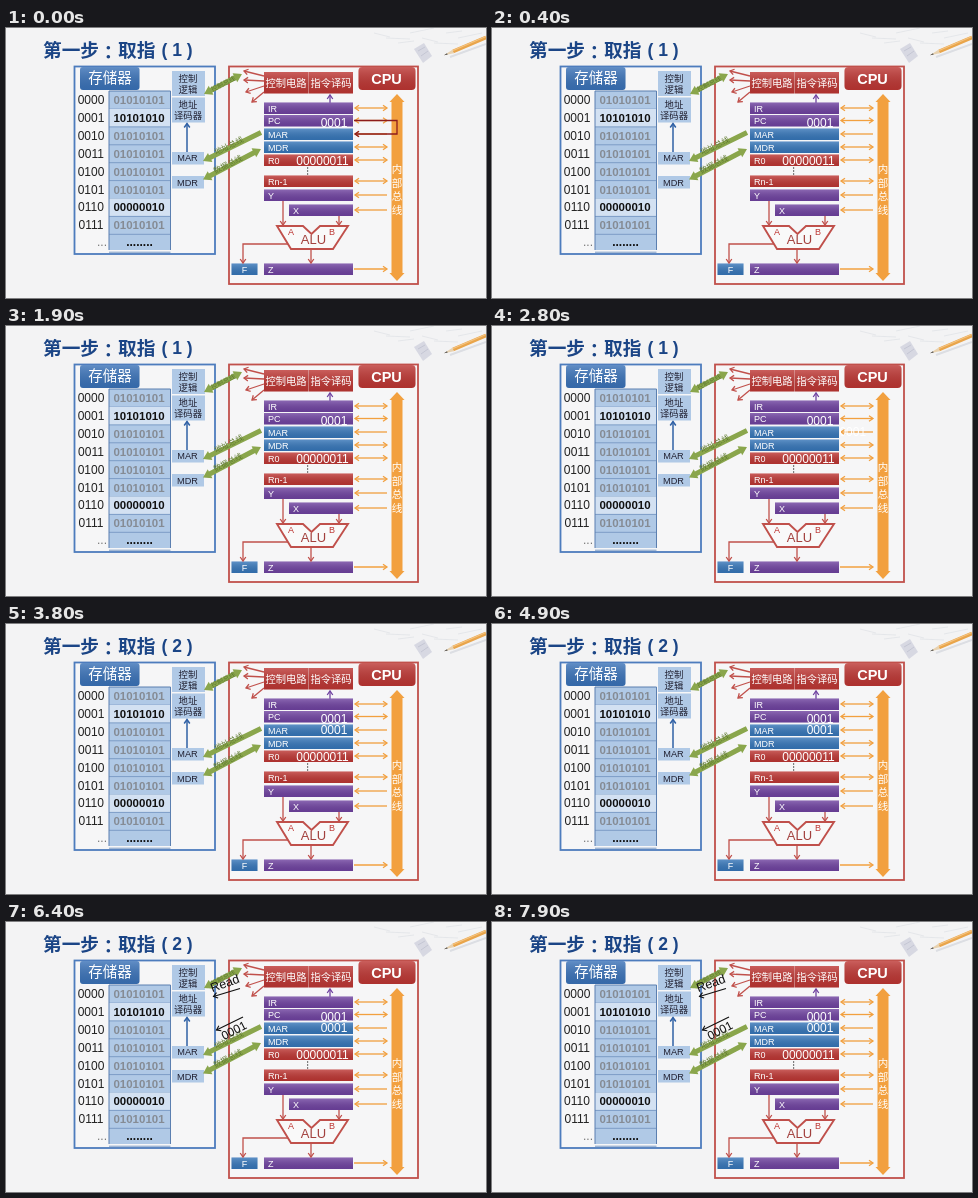
These frames come from a looping animation (480x270 px, 8000 ms). An HTML page:

```html
<!DOCTYPE html>
<html lang="zh-Hans">
<head>
<meta charset="utf-8">
<style>
html, body { margin: 0; width: 100%; height: 100%; overflow: hidden; background: #f3f3f4; }
svg { display: block; width: 480px; height: 270px; }
text { font-family: "Liberation Sans", "Noto Sans CJK SC", "Noto Sans CJK", sans-serif; dominant-baseline: central; }
.colon { font-family: "Noto Sans CJK TC", "Noto Sans CJK", sans-serif; }
</style>
</head>
<body>
<svg id="stage" viewBox="0 0 480 270">
  <defs>
    <linearGradient id="shine" x2="0" y2="1">
      <stop offset="0" stop-color="#fff" stop-opacity=".2"/><stop offset="1" stop-color="#000" stop-opacity=".08"/>
    </linearGradient>
  </defs>
  <rect width="480" height="270" fill="#f3f3f4"/>
  <g id="decor"></g>
  <g id="board"></g>
  <g id="moving"></g>
</svg>
<script>
const $ = id => document.getElementById(id);
const RED = '#bd3633', LINE_RED = '#c0504b', BLUE = '#3676b9', PURPLE = '#6f42a0',
      ORANGE = '#f2a03f', GREEN = '#8aa64c', NAVY = '#1b4586', PALE = '#b0c9e6';
let layer = $('decor');

function add(tag, attrs, content) {
  const el = document.createElementNS('http://www.w3.org/2000/svg', tag);
  for (const k in attrs) el.setAttribute(k, attrs[k]);
  if (content !== undefined) el.textContent = content;
  layer.appendChild(el);
  return el;
}

function group(parent) {
  layer = parent;
  return layer = add('g', {});
}

const box = (x, y, w, h, fill, more) => add('rect', { x, y, width: w, height: h, fill, ...more });

function glossy(x, y, w, h, fill, more) {
  box(x, y, w, h, fill, more);
  box(x, y, w, h, 'url(#shine)', more);
}

const label = (s, x, y, size, fill, more) =>
  add('text', { x, y, 'font-size': size, fill, 'text-anchor': 'middle', ...more }, s);

const path = (d, stroke, width = 1, fill = 'none') =>
  add('path', { d, stroke, 'stroke-width': width, fill });

const degrees = (x1, y1, x2, y2) => Math.atan2(y2 - y1, x2 - x1) * 180 / Math.PI;

function openHead(x, y, angle, color, width, size) {
  add('path', { d: `M${-size} ${-size * 0.7}L0 0L${-size} ${size * 0.7}`, fill: 'none', stroke: color,
    'stroke-width': width, transform: `translate(${x} ${y}) rotate(${angle})` });
}

// ends: 1 = head at the end, 2 = heads on both ends
function arrow(x1, y1, x2, y2, color, width = 1.3, ends = 1, size = 4) {
  const deg = degrees(x1, y1, x2, y2);
  path(`M${x1} ${y1}L${x2} ${y2}`, color, width);
  openHead(x2, y2, deg, color, width, size);
  if (ends > 1) openHead(x1, y1, deg + 180, color, width, size);
}

// Thick arrow with solid heads, drawn along its own axis
function bus(x1, y1, x2, y2, ends) {
  const n = Math.hypot(x2 - x1, y2 - y1), w = 2.6, h = 5, s = 8;
  const tail = ends > 1 ? `${s} ${w}V${h}L0 0L${s} ${-h}V${-w}` : `0 ${w}V${-w}`;
  add('path', { d: `M${tail}H${n - s}V${-h}L${n} 0L${n - s} ${h}V${w}Z`, fill: GREEN,
    transform: `translate(${x1} ${y1}) rotate(${degrees(x1, y1, x2, y2)})` });
}

function tilted(s, x, y, angle, size, fill) {
  label(s, x, y, size, fill, { transform: `rotate(${angle} ${x} ${y})` });
}

function drawDecor() {
  for (let i = 0; i < 8; i++) {
    path(`M${368 + i * 12} ${5 + i % 3 * 5}l${16 + i % 2 * 8} ${4 - i % 4 * 3}`, '#dfe1e6', 0.7);
  }
  path('M408 21L418 15L426 28L417 35Z', 'none', 0, '#d7d8e2');
  path('M412 23L419 19M415 28L422 23', '#bfc2d0', 0.8);
  path('M444 29L480 16', '#dcdee3', 2);
  path('M447 23.5L480 9.5', '#e9a54b', 3.6);
  path('M447 22.5L480 8.5', '#f5c583', 1.1);
  path('M438 27.3L446.4 21.8L447.8 25.2Z', 'none', 0, '#e8d2b0');
  path('M438 27.3L441 25.3L441.7 26.6Z', 'none', 0, '#444');
}

function drawMemory() {
  box(68.5, 38.5, 140.5, 187.5, '#f6f6f7', { stroke: '#4d7cbd', 'stroke-width': 1.8 });
  glossy(74, 39, 59.5, 23, '#3a72b8', { rx: 3 });
  label('存储器', 104, 50, 14.5, '#fff');
  box(103, 63, 61.5, 159, PALE);
  for (let i = 0; i < 9; i++) {
    const y = 72 + i * 17.9, hot = i === 1 || i === 6;
    if (hot) box(103, y - 9, 61.5, 18, '#d3e1f2');
    path(`M103 ${y + 9}H164.5`, '#7c9cc6', 1);
    if (i === 8) {
      label('...', 96, y - 1, 12, '#777');
      label('........', 133.5, y - 1, 12, '#111', { 'font-weight': 700 });
      continue;
    }
    const data = hot ? (i === 1 ? '10101010' : '00000010') : '01010101';
    label(i.toString(2).padStart(4, '0'), 85, y, 12, '#222');
    label(data, 133, y, 11.5, hot ? '#111' : '#858b94', { 'font-weight': 700 });
  }
  path('M103 63V222M164.5 63V222M103 63H164.5', '#5b7fb0', 1);

  box(166, 43, 33, 25, PALE);
  box(166, 69.5, 33, 25, PALE);
  box(166, 124, 32, 12.5, PALE);
  box(166, 148, 32, 12.5, PALE);
  [['控制', 50.5], ['逻辑', 61.5], ['地址', 76], ['译码器', 87]]
    .forEach(([s, y]) => label(s, 182, y, 9.4, '#223'));
  label('MAR', 181.5, 130.3, 9.2, '#223');
  label('MDR', 181.5, 154.5, 9.2, '#223');
  arrow(181, 124, 181, 95.5, '#2f60a5', 1.5);
}

function drawRegister(name, y, color, ends, x = 258) {
  glossy(x, y - 5.5, 347 - x, 11.5, color);
  label(name, x + 4, y + 0.5, 9, '#fff', { 'text-anchor': 'start' });
  if (name === 'Z') arrow(348, y, 381, y, ORANGE);
  else arrow(381, y, 349, y, ORANGE, 1.3, ends);
}

function drawCpu() {
  box(223, 38.5, 189, 217.5, '#f6f6f7', { stroke: LINE_RED, 'stroke-width': 1.8 });
  glossy(352.5, 39, 57, 23, RED, { rx: 4 });
  label('CPU', 380.5, 50.5, 14.5, '#fff', { 'font-weight': 700 });
  glossy(258, 44, 44.5, 21.5, RED);
  glossy(302.8, 44, 44.2, 21.5, RED);
  label('控制电路', 280, 55, 10.3, '#fff');
  label('指令译码', 325, 55, 10.3, '#fff');
  [[48, 238, 43], [53, 238, 52], [58, 240, 64], [64, 246, 74]]
    .forEach(([y, tx, ty]) => arrow(258, y, tx, ty, LINE_RED));
  arrow(324, 75, 324, 67, PURPLE);

  path('M391 66L398.5 74H396.5V245H398.5L391 253L383.5 245H385.5V74H383.5Z', 'none', 0, ORANGE);
  [...'内部总线'].forEach((c, i) => label(c, 391, 141 + i * 13.5, 10.5, '#fff'));

  drawRegister('IR', 80, PURPLE, 2);
  drawRegister('PC', 92.5, PURPLE, 2);
  drawRegister('MAR', 106, BLUE, 1);
  drawRegister('MDR', 119, BLUE, 2);
  drawRegister('R0', 132, RED, 2);
  drawRegister('Rn-1', 153, RED, 2);
  drawRegister('Y', 167, PURPLE, 1);
  drawRegister('X', 182, PURPLE, 1, 283);
  drawRegister('Z', 241, PURPLE, 1);
  glossy(225.5, 235.5, 26, 11.5, BLUE);
  label('F', 238.5, 241.5, 9, '#fff');
  label('0001', 328, 94.5, 12, '#fff');
  label('00000011', 316.5, 132.5, 12, '#fff');
  [140, 143, 146].forEach(y => box(301, y - 0.6, 1.2, 1.2, '#333'));

  path('M271 198H297L305.5 206L314 198H342L327 221H285Z', LINE_RED, 1.9, '#f9f9f9');
  label('A', 285, 204, 9, RED);
  label('B', 326, 204, 9, RED);
  label('ALU', 307.5, 211.5, 13, '#a2403d');
  arrow(277, 173, 277, 197, LINE_RED);
  arrow(333, 188, 333, 197, LINE_RED);
  arrow(305, 221, 305, 235, LINE_RED);
  path('M282 216H237V235', LINE_RED, 1.3);
  openHead(237, 235, 90, LINE_RED, 1.3, 4);
}

function drawBuses() {
  bus(198, 66, 236, 46, 2);
  bus(255, 104.5, 197, 133, 1);
  bus(197, 151.5, 255, 121, 2);
  tilted('控制总线', 217, 55.5, -27, 6.5, '#5f7a30');
  tilted('地址总线', 223, 118, -26, 7.8, '#5f7a30');
  tilted('数据总线', 222, 136.5, -27, 7.8, '#5f7a30');
}

drawDecor();
layer = $('board');
drawMemory();
drawCpu();
drawBuses();

const heading = { 'font-size': 18.7, 'font-weight': 700, 'text-anchor': 'start' };
label('第一步', 37, 22, 0, NAVY, heading);
label('：', 93, 22, 0, NAVY, { ...heading, class: 'colon', lang: 'zh-Hant' });
label('取指', 112, 22, 0, NAVY, heading);
const part = label('', 171, 22, 17.5, NAVY, { 'font-weight': 700, 'xml:space': 'preserve' });

const route = group($('moving'));
path('M348 92.5H391V106H349', '#8d1c1c', 1.3);
openHead(349, 106, 180, '#8d1c1c', 1.3, 4);

const token = group($('moving'));
label('0001', 0, 0, 12, '#fff');

const address = group($('moving'));
tilted('0001', 228, 108.5, -27, 12, '#111');
arrow(237, 95, 210.5, 108, '#111', 1.1);

const read = group($('moving'));
tilted('Read', 219, 61.5, -20, 12.5, '#111');
arrow(234, 66.5, 207.5, 74.5, '#111', 1.1);

const ramp = (t, a, b) => Math.min(1, Math.max(0, (t - a) / (b - a)));

// From PC out to the bus, down, and back into MAR
function tokenPlace(p) {
  const out = 56, down = 11.5, s = p * (2 * out + down);
  if (s < out) return [328 + s, 94.5];
  if (s < out + down) return [328 + out, 94.5 + s - out];
  return [328 + 2 * out + down - s, 106];
}

function render(t) {
  part.textContent = `( ${t < 3700 ? 1 : 2} )`;
  route.style.opacity = t < 800 ? 1 - ramp(t, 50, 400) : ramp(t, 950, 1200) - ramp(t, 1450, 1850);
  token.style.display = t < 2300 ? 'none' : '';
  token.setAttribute('transform', `translate(${tokenPlace(ramp(t, 2250, 3000))})`);
  address.style.opacity = ramp(t, 5050, 5900) ** 3;
  read.style.opacity = ramp(t, 5950, 6400);
}

const start = performance.now();
function tick() {
  render((performance.now() - start) % 8000);
  requestAnimationFrame(tick);
}
tick();
</script>
</body>
</html>
```
